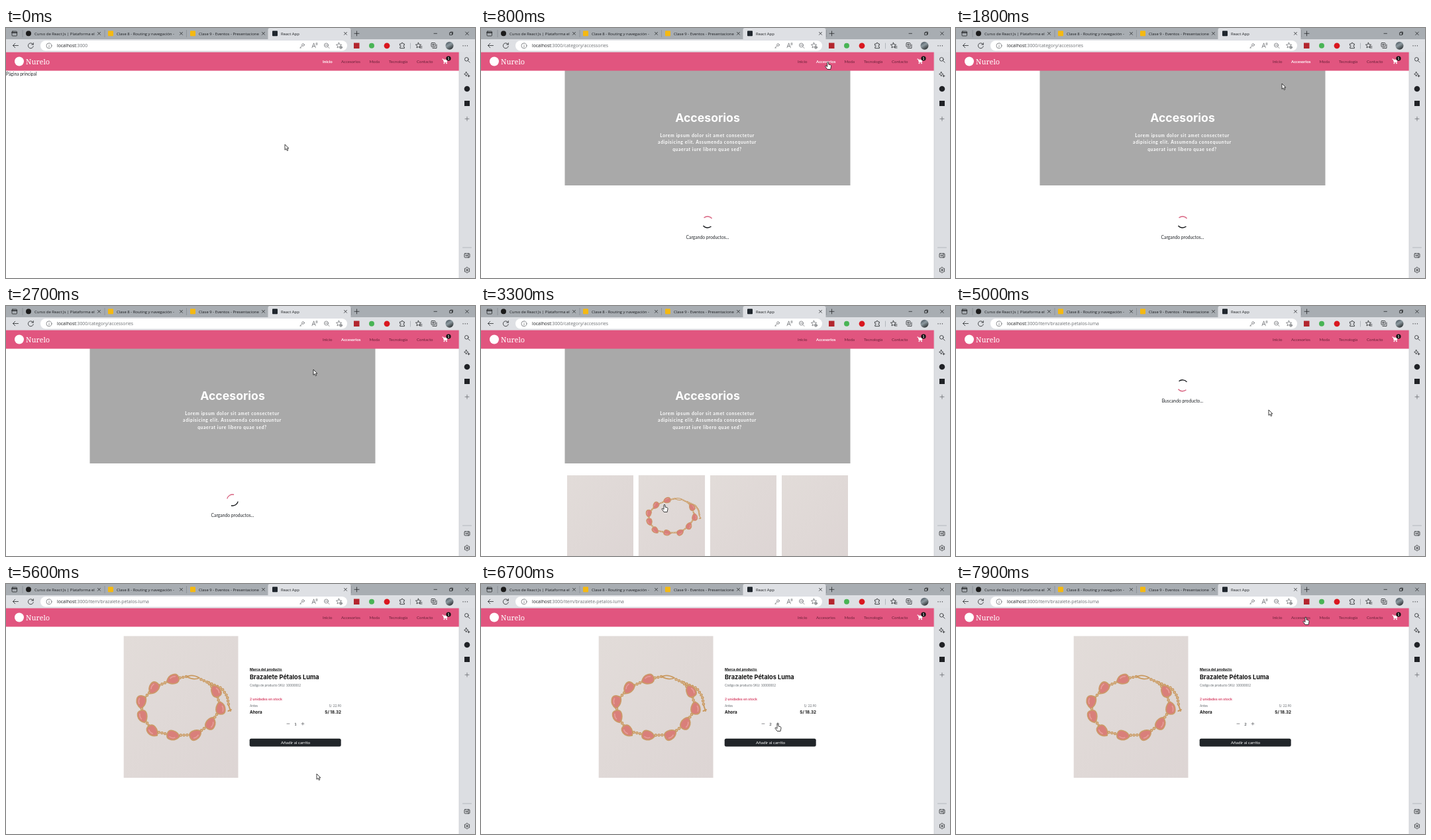
Write an HTML page that moves like this. It is 708 px wide and 378 px high and loops after 8000 ms.

```html
<!DOCTYPE html>
<html lang="es">
<head>
<meta charset="utf-8">
<title>Tienda</title>
<style>
  html, body { margin: 0; width: 100%; height: 100%; overflow: hidden; background: #fff; }
  svg { display: block; width: 708px; height: 378px; }
  text { font: 6.75px Lato, sans-serif; fill: #212529; white-space: pre; }
  .ui text { font: 5.95px "Open Sans", sans-serif; fill: #1b1d20; }
  .ui .url { font-size: 6.85px; }
  .ui .path { fill: #6b6e72; }
  .icon { fill: none; stroke: #25272a; stroke-width: .8; stroke-linecap: round; stroke-linejoin: round; }
  .icon.soft { stroke: #5c5f64; stroke-width: .7; }
  .nav text { font-size: 6.1px; fill: #6b2239; }
  .nav .brand { font: 11px "Noto Serif", serif; fill: #fff; }
  .nav .active { fill: #fff; font-weight: 700; }
  .mid { text-anchor: middle; }
  .end { text-anchor: end; }
  .lorem { fill: #fff; font-weight: 700; letter-spacing: .63px; text-anchor: middle; }
  .bold { font-family: Inter, sans-serif; font-weight: 700; fill: #111; }
  .small { font-size: 4.8px; fill: #666b70; }
</style>
</head>
<body>
<svg viewBox="0 0 708 378">
  <defs>
    <linearGradient id="paper" x2="1" y2="1">
      <stop stop-color="#e2dcd9"/><stop offset="1" stop-color="#ddd5d4"/>
    </linearGradient>
    <linearGradient id="avatar" x2=".6" y2="1">
      <stop stop-color="#3b4650"/><stop offset=".5" stop-color="#8d9aa0"/><stop offset="1" stop-color="#33383a"/>
    </linearGradient>
    <g id="photo">
      <rect x="177.7" y="78.7" width="172.8" height="214.3" fill="url(#paper)"/>
      <g id="bracelet"></g>
    </g>
  </defs>

  <rect width="708" height="378" fill="#fff"/>

  <g id="home"><text x="0" y="72">Página principal</text></g>

  <g id="category">
    <rect x="126.5" y="64" width="431" height="174" fill="#a9a9a9"/>
    <text class="bold mid" x="342" y="141.5" style="font-size:17.7px;fill:#fff">Accesorios</text>
    <text class="lorem" x="341.5" y="164.5">Lorem ipsum dolor sit amet consectetur</text>
    <text class="lorem" x="341.5" y="175">adipisicing elit. Assumenda consequuntur</text>
    <text class="lorem" x="341.5" y="185.5">quaerat iure libero quae sed?</text>
  </g>

  <g id="products">
    <g fill="url(#paper)">
      <rect x="130" y="256" width="100" height="122"/>
      <rect x="346" y="256" width="100" height="122"/>
      <rect x="454" y="256" width="100" height="122"/>
    </g>
    <use href="#photo" transform="translate(238 256) scale(.58) translate(-178 -79)"/>
  </g>

  <g id="loader">
    <g id="ring" fill="none" stroke-width="1.4">
      <path d="M-6-6A8.5 8.5 0 0 1 6-6" stroke="#d8617f"/>
      <path d="M-6 6A8.5 8.5 0 0 0 6 6" stroke="#16181b"/>
    </g>
    <text id="message" class="mid" x="0" y="25.5"></text>
  </g>

  <g id="item">
    <use href="#photo"/>
    <text class="bold" x="368" y="130.5" style="font-size:5.1px">Marca del producto</text>
    <path d="M368 131.6h49" stroke="#212529" stroke-width=".5"/>
    <text class="bold" x="368" y="144" style="font-size:9.2px">Brazalete Pétalos Luma</text>
    <text class="small" x="368" y="154.5">Código de producto SKU: 10000002</text>
    <text class="bold" x="368" y="175.5" style="font-size:5px;fill:#d94f70">2 unidades en stock</text>
    <text class="small" x="368" y="186">Antes</text>
    <text class="small end" x="506" y="186">S/ 22.90</text>
    <text class="bold" x="368" y="196.3" style="font-size:6.3px">Ahora</text>
    <text class="bold end" x="506" y="196.3" style="font-size:6.3px">S/ 18.32</text>
    <path class="icon soft" d="M424 211.3h4M446 211.3h4m-2-2v4"/>
    <text id="count" class="mid" x="437" y="214" style="font-size:6px">1</text>
    <rect x="367.7" y="233.7" width="138" height="12" rx="2.5" fill="#212529"/>
    <text class="mid" x="437" y="241.8" style="font-size:6.3px;fill:#fff">Añadir al carrito</text>
  </g>

  <g class="ui">
    <rect width="708" height="18" fill="#a8adb2"/>
    <rect y="17" width="708" height="20" fill="#dee0e4"/>
    <rect x="684" y="36" width="24" height="342" fill="#dcdee2"/>
    <path d="M684 37v341" stroke="#c6c9cd" stroke-width=".7"/>
    <path d="M395.5 18V3q0-3 3-3h119q3 0 3 3v15z" fill="#dee0e4"/>
    <rect x="52" y="19" width="463" height="15.5" rx="7.7" fill="#fff"/>
    <path d="M25 3v11M149 3v11M272.5 3v11M521.5 3v11" stroke="#868b90" stroke-width=".7"/>
    <circle cx="34" cy="8.3" r="4" fill="#1b1b1b"/>
    <rect x="154" y="4.3" width="8" height="8" rx="1" fill="#f5b912"/>
    <rect x="278" y="4.3" width="8" height="8" rx="1" fill="#f5b912"/>
    <rect x="402" y="4.3" width="8" height="8" rx="1" fill="#20272e"/>
    <text x="43" y="10.5">Curso de React Js | Plataforma el</text>
    <text x="167" y="10.5">Clase 8 - Routing y navegación -</text>
    <text x="291" y="10.5">Clase 9 - Eventos - Presentacione</text>
    <text x="415" y="10.5">React App</text>
    <rect x="382" y="2" width="13" height="14" fill="#a8adb2"/>
    <g class="icon">
      <rect x="9" y="5" width="7.5" height="7" rx="1"/><path d="M9 7h7.5" stroke-width="1.5"/>
      <path id="closers"/>
      <path d="M526 8.3h7m-3.5-3.5v7M646 8.3h4.5M693.7 6l4.6 4.6m0-4.6l-4.6 4.6"/>
      <path d="M670 7h3.5v3.5H670zM671 7v-1h3.5v3.5h-1"/>
      <path d="M18.5 26.5h-8m3.3-3.3l-3.3 3.3 3.3 3.3"/>
      <path d="M41 25a4 4 0 1 0 .3 2.7M41.3 22.5V25h-2.6"/>
    </g>
    <g class="icon soft">
      <circle cx="65" cy="26.8" r="4"/><path d="M65 26.5v2.4M65 24.7v.1"/>
      <circle cx="448.5" cy="25.5" r="1.8"/><path d="M447 26.8l-3.3 3.2h1.8"/>
      <path d="M462 29.8l2.6-7 2.6 7m-4.3-2.3h3.4M468 23q1 1 0 2m1.2-3q1.8 2 0 4"/>
      <circle cx="483.5" cy="26" r="3"/><path d="M482 26h3M486 28.5l2 2"/>
      <path id="starA"/><circle cx="505.5" cy="29.3" r="2" fill="#fff"/><path d="M504.5 29.3h2m-1-1v2"/>
    </g>
    <rect x="525" y="22.5" width="8.5" height="8.5" fill="#b3262e"/>
    <circle cx="552" cy="26.8" r="4" fill="#49b455"/>
    <circle cx="575" cy="26.8" r="4.4" fill="#d9171f"/>
    <g class="icon">
      <path d="M594.8 24h2q0-1.8 1.3-1.8t1.3 1.8h2v2.2q-1.7 0-1.7 1.2t1.7 1.2v2h-6.6v-2q1.5 0 1.5-1.2t-1.5-1.2z"/>
      <path d="M610.5 23v8" stroke="#a8adb2"/>
      <path id="starB"/><path d="M624.5 27.8h3.5M625 30h3"/>
      <rect x="642" y="22.5" width="6" height="6" rx="1"/><path d="M650 25v5.5h-6M645 24v3m-1.5-1.5h3"/>
    </g>
    <circle cx="669.5" cy="26.8" r="6" fill="url(#avatar)"/>
    <path d="M690 26.8h.1M693.2 26.8h.1M696.4 26.8h.1" class="icon" style="stroke-width:1.3"/>
    <g class="icon">
      <circle cx="695.3" cy="47.3" r="2.8"/><path d="M697.5 49.5l2.6 2.6"/>
      <path d="M694.7 66.5q.3 2.8 3 3.2-2.7.5-3 3.2-.4-2.7-3-3.2 2.6-.4 3-3.2zM698.5 71v3m-1.5-1.5h3"/>
      <path class="icon soft" d="M693 137.3h6m-3-3v6"/>
      <path d="M689.5 332h13" stroke="#a8adb2"/>
      <rect x="692" y="341" width="8" height="6" rx="1"/><path d="M698 341v6M693.5 344h3m-1-1l1 1-1 1"/>
      <path id="gear"/><circle cx="696" cy="366" r="1.3"/>
    </g>
    <circle cx="696" cy="92" r="4.3" fill="#202226"/>
    <rect x="692" y="110" width="8" height="8" fill="#202226"/>
    <text class="url" x="77" y="29.3">localhost<tspan id="path" class="path"></tspan></text>
  </g>

  <g class="nav">
    <rect y="36.6" width="683.7" height="28" fill="#e1557f"/>
    <circle cx="20" cy="50.5" r="7" fill="#fff"/>
    <text class="brand" x="30" y="55">Nurelo</text>
    <text id="navHome" x="478" y="53">Inicio</text>
    <text id="navCategory" x="506" y="53">Accesorios</text>
    <text x="548.5" y="53">Moda</text>
    <text x="578" y="53">Tecnología</text>
    <text x="620" y="53">Contacto</text>
    <path d="M658.5 47h1.5l1.3 4.5h4l1-3.3h-5.6" fill="#fff" stroke="#fff"/>
    <circle cx="661.5" cy="53.2" r="1" fill="#fff"/><circle cx="665" cy="53.2" r="1" fill="#fff"/>
    <circle cx="668" cy="46" r="3.6" fill="#111"/>
    <text class="mid active" x="668" y="47.8" style="font-size:5px">1</text>
  </g>

  <g id="cursor" fill="#fff" stroke="#111" stroke-width=".8" stroke-linejoin="round">
    <path id="arrow" d="M0 0v8.3l1.9-1.7 1.5 3 1.4-.7-1.4-2.9h2.5z"/>
    <path id="hand" d="M-1 1Q0-1 1 1v3l3 .8q1.2.5 1 2l-.9 4.7H-.8L-3.9 7.3q-.3-1.7 1.3-1L-1 7.5z"/>
  </g>
</svg>
<script>
const $ = id => document.getElementById(id);
const show = (id, on) => $(id).style.display = on ? '' : 'none';

// Small outline icons
$('closers').setAttribute('d', [140.5, 264.5, 388.5, 512.5]
  .map(x => `M${x - 2} 6.3l4 4m0-4l-4 4`).join(''));

function star(cx, cy, outer, inner, tips) {
  const points = Array.from({ length: tips * 2 }, (_, i) => {
    const a = i * Math.PI / tips, r = i % 2 ? inner : outer;
    return `${cx + r * Math.sin(a)} ${cy - r * Math.cos(a)}`;
  });
  return `M${points.join('L')}z`;
}
$('starA').setAttribute('d', star(502.5, 26.5, 4.3, 2, 5));
$('starB').setAttribute('d', star(622.5, 26.5, 4.3, 2, 5));
$('gear').setAttribute('d', star(696, 366, 4.3, 3.4, 6));

// Bracelet: gold links with drop-shaped stones lying along the chain
const stones = [[252, 144], [223, 157], [204, 178], [206, 200], [221, 222],
  [252, 229], [286, 228], [309, 211], [324, 188], [317, 162]];
const links = `M272 140L${stones.join('L')}L305 149L292 143M306 149L326 158L334 170L336 182`;
const strand = (color, width, dash) =>
  `<path d="${links}" stroke="${color}" stroke-width="${width}" stroke-dasharray="${dash}"/>`;
$('bracelet').innerHTML = `
  <g fill="none" stroke-linecap="round" stroke-linejoin="round">
    ${strand('#c9995f', 4.6, '0 4.8')}${strand('#e2d2c4', 1.6, '0 4.8')}
    <path d="M273 140q8-4 19 2-9 4-19-2" stroke="#c9995f" stroke-width="1.8"/>
    <path d="M336 183l3 9m-3.500 0l4.500-2" stroke="#c9995f" stroke-width="2"/>
  </g>` + stones.map(([x, y]) => {
    const turn = Math.atan2(y - 187, x - 264) * 180 / Math.PI + 90;
    return `<g transform="translate(${x} ${y}) rotate(${turn})">
      <path d="M-10 1Q-6-7 2-7 9-7 9 0 9 7 2 7-6 7-10 1z" fill="#d97f7a" stroke="#cb9a68" stroke-width="1.7"/>
      <path d="M-4-2Q0-5 5-3" fill="none" stroke="#e6a09a" stroke-width="1.5"/></g>`;
  }).join('');

// Pointer stops: time, x, y
const stops = [[0, 421, 176], [200, 421, 176], [600, 524, 51], [1100, 523, 51], [1800, 492, 84],
  [2400, 464, 96], [2700, 464, 96], [3200, 277, 300], [3600, 277, 300], [3900, 279, 310],
  [4500, 467, 152], [5000, 472, 157], [5400, 469, 284], [5600, 469, 287], [6000, 468, 285],
  [6500, 448, 211], [7200, 448, 211], [7600, 543, 25], [7900, 528, 50], [8000, 528, 50]];

function pointerAt(t) {
  const i = stops.findIndex(s => s[0] > t);
  const [t0, x0, y0] = stops[i - 1], [t1, x1, y1] = stops[i];
  const k = (t - t0) / (t1 - t0), e = k * k * (3 - 2 * k);
  return [x0 + (x1 - x0) * e, y0 + (y1 - y0) * e];
}

function draw() {
  const t = Math.floor(performance.now() % 8000 / 100) * 100;
  const within = (a, b) => t >= a && t < b;
  const inCategory = within(700, 3500), searching = within(3500, 5500);

  show('home', t < 700);
  show('category', inCategory);
  show('products', within(2800, 3500));
  show('loader', within(700, 2800) || searching);
  show('item', t >= 5500);

  $('loader').setAttribute('transform', `translate(342 ${searching ? 120.3 : 293.5})`);
  $('ring').setAttribute('transform', `rotate(${(t - (searching ? 3500 : 800)) * .36 + 5})`);
  $('message').textContent = searching ? 'Buscando producto...' : 'Cargando productos...';
  $('path').textContent = ':3000' + (t < 700 ? '' :
    t < 3600 ? '/category/accessories' : '/item/brazalete-petalos-luma');
  $('navHome').classList.toggle('active', t < 700);
  $('navCategory').classList.toggle('active', inCategory);
  $('count').textContent = t < 6700 ? 1 : 2;

  const pointing = within(600, 1200) || within(3200, 3500) || within(6400, 7300) || t >= 7800;
  show('hand', pointing);
  show('arrow', !pointing);
  $('cursor').setAttribute('transform', `translate(${pointerAt(t)})`);
  requestAnimationFrame(draw);
}
draw();
</script>
</body>
</html>
```
